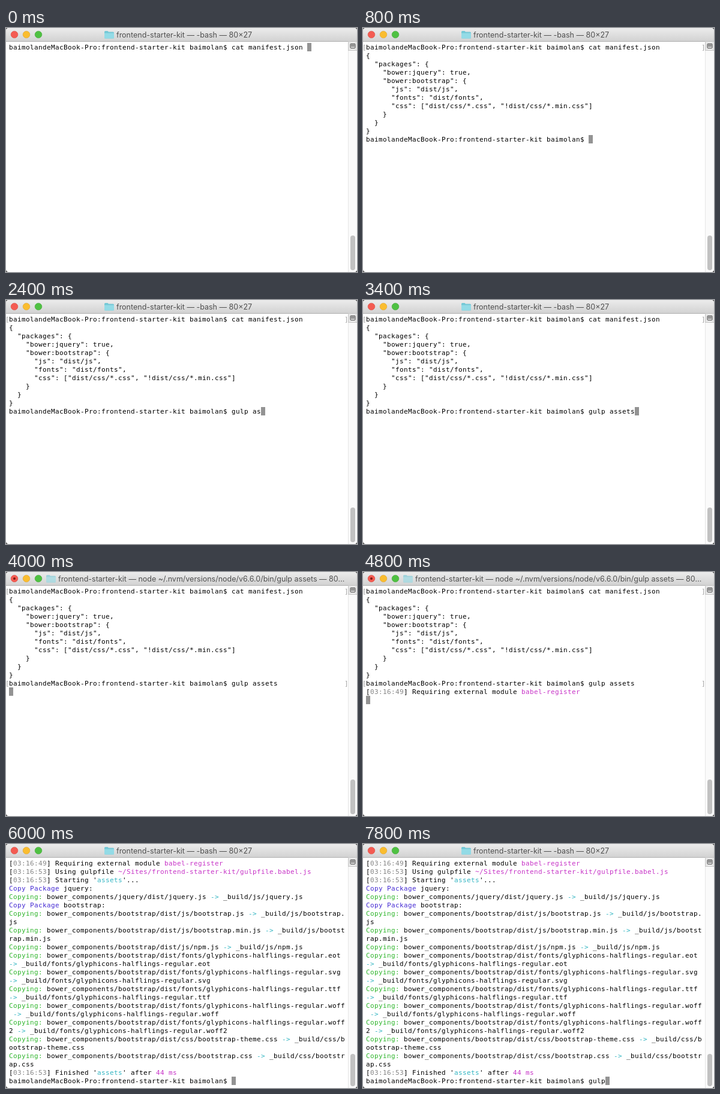
An HTML page that plays this animation: 585x408 px, repeating every 8 s.

```html
<!DOCTYPE html>
<html lang="en">
<head>
<meta charset="utf-8">
<title>Terminal</title>
<style>
  html, body { margin: 0; width: 100%; height: 100%; overflow: hidden; background: #4c4c4c; }
  svg { display: block; width: 585px; height: 408px; }
  text { white-space: pre; }
  #screen { font: 11px "DejaVu Sans Mono", monospace; font-variant-ligatures: none; }
  #title { font: 12.5px Inter, sans-serif; fill: #505050; }
</style>
</head>
<body>
<svg viewBox="0 0 585 408">
  <defs>
    <linearGradient id="bar" x2="0" y2="1">
      <stop stop-color="#ececec"/>
      <stop offset="1" stop-color="#d2d2d2"/>
    </linearGradient>
    <clipPath id="frame"><rect width="585" height="408" rx="4.5"/></clipPath>
  </defs>
  <g clip-path="url(#frame)">
    <rect width="585" height="408" fill="#fff"/>
    <rect width="585" height="22" fill="url(#bar)"/>
    <rect y="22" width="585" height="1" fill="#b1b1b1"/>
    <g stroke-width=".6">
      <circle cx="14" cy="11" r="5.8" fill="#f45b52" stroke="#d9483f"/>
      <circle cx="34" cy="11" r="5.8" fill="#fabd2f" stroke="#dda02a"/>
      <circle cx="54" cy="11" r="5.8" fill="#4fc142" stroke="#3da533"/>
    </g>
    <circle id="busy" cx="14" cy="11" r="2" fill="#7d1a14"/>
    <g id="folder">
      <path d="M0 1.5q0-1.5 1.5-1.5h4l1.5 1.5h7.500q1.500 0 1.500 1.500v8q0 1.500-1.500 1.500h-13q-1.500 0-1.500-1.500z" fill="#74c8d6"/>
      <path d="M0 3.500h16v7.500q0 1.500-1.500 1.500h-13q-1.500 0-1.500-1.500z" fill="#93dbe6"/>
    </g>
    <text id="title" y="16"></text>
    <rect x="570" y="23" width="15" height="385" fill="#fafafa"/>
    <rect x="570" y="23" width="1" height="385" fill="#e6e6e6"/>
    <rect x="570.5" y="22.500" width="15" height="15" fill="#e6e6e6" stroke="#c6c6c6"/>
    <rect x="574" y="26.500" width="8" height="7" rx="1" fill="#eee" stroke="#3c3c3c"/>
    <path d="M575 28.500h6M575 30.500h6" stroke="#3c3c3c"/>
    <rect id="thumb" x="574" width="8" rx="4" fill="#c1c1c1"/>
    <rect id="cursor" width="7" height="14" fill="#939393"/>
    <g id="screen"></g>
  </g>
</svg>
<script>
const LOOP = 8000, STEP = 200;
const COLS = 80, ROWS = 27, CW = 7, CH = 14, LEFT = 5, TOP = 25;
const COLORS = { k: '#000', e: '#858585', m: '#c733c7', c: '#33b5c2', g: '#2fb52c', b: '#452bd3', x: '#a0a0a0' };
const $ = id => document.getElementById(id);

const user = 'baimolan', dir = 'frontend-starter-kit';
const prompt = `${user}deMacBook-Pro:${dir} ${user}$ `;

// Coloured runs are written as ‹ + colour key + text + ›
const stamp = (sec, s) => `[‹e03:16:${sec}›] ${s}`;
const pack = name => `‹bCopy Package› ${name}:`;
const copy = (from, to) => `‹gCopying:› bower_components/${from}/${to} ‹c->› _build/${to.slice(5)}`;

const manifest = `{
  "packages": {
    "bower:jquery": true,
    "bower:bootstrap": {
      "js": "dist/js",
      "fonts": "dist/fonts",
      "css": ["dist/css/*.css", "!dist/css/*.min.css"]
    }
  }
}`.split('\n');

const requiring = stamp(49, 'Requiring external module ‹mbabel-register›');
const boot = file => copy('bootstrap', 'dist/' + file);
const log = [
  stamp(53, `Using gulpfile ‹m~/Sites/${dir}/gulpfile.babel.js›`),
  stamp(53, "Starting '‹cassets›'..."),
  pack('jquery'),
  '‹gCopying:› bower_components/jquery/dist/jquery.js ‹c->› _build/js/jquery.js',
  pack('bootstrap'),
  ...['bootstrap.js', 'bootstrap.min.js', 'npm.js'].map(f => boot('js/' + f)),
  ...['eot', 'svg', 'ttf', 'woff', 'woff2'].map(x => boot('fonts/glyphicons-halflings-regular.' + x)),
  ...['bootstrap-theme.css', 'bootstrap.css'].map(f => boot('css/' + f)),
  stamp(53, "Finished '‹cassets›' after ‹m44 ms›")
];

const idle = { icon: 164, text: `${dir} — -bash — 80×27` };
const starting = { icon: 67, text: `${dir} — node ~/.nvm/versions/node/v6.6.0/bin/gulp assets — 80…` };
const running = { icon: 67, text: `${dir} — gulp MANPATH=/Users/${user}/.nvm/versions/node/v6.…` };

const typed = (cmd, start, t) => cmd.slice(0, Math.max(0, Math.floor((t - start) / STEP) + 1));

// Lines on the terminal at time t; the last one holds the cursor.
function session(t) {
  const cat = prompt + 'cat manifest.json';
  if (t < 400) return { lines: [cat + ' '], entered: [], title: idle };
  const lines = [cat, ...manifest];
  if (t < 3800) {
    lines.push(prompt + typed('gulp assets', 1200, t));
    return { lines, entered: [0], title: idle };
  }
  const entered = [0, lines.length];
  lines.push(prompt + 'gulp assets');
  if (t >= 4200) lines.push(requiring);
  if (t >= 5000) lines.push(...log);
  lines.push(t < 5200 ? '' : prompt + typed('gulp', 7200, t));
  return { lines, entered, title: t < 5000 ? starting : t < 5200 ? running : idle };
}

// Splits a marked-up line into rows of [character, colour] cells.
function wrap(line) {
  const cells = [], rows = [];
  for (const [all, key, text] of line.matchAll(/‹(\w)(.*?)›|[^‹]+/g))
    for (const ch of text || all) cells.push([ch, key || 'k']);
  do rows.push(cells.splice(0, COLS)); while (cells.length);
  return rows;
}

function put(str, x, row, key) {
  const el = document.createElementNS('http://www.w3.org/2000/svg', 'text');
  el.setAttribute('x', [...str].map((_, i) => x + i * CW).join(' '));
  el.setAttribute('y', TOP + row * CH + 11);
  el.setAttribute('fill', COLORS[key]);
  el.textContent = str;
  $('screen').append(el);
}

function putRow(cells, row) {
  for (let i = 0; i < cells.length;) {
    const start = i, key = cells[i][1];
    let str = '';
    while (i < cells.length && cells[i][1] === key) str += cells[i++][0];
    put(str, LEFT + start * CW, row, key);
  }
}

function draw(t) {
  const { lines, entered, title } = session(t);
  const rows = [], marks = [];
  lines.forEach((line, i) => {
    if (entered.includes(i)) marks.push(rows.length);
    rows.push(...wrap(line));
  });
  const top = Math.max(0, rows.length - ROWS);

  $('screen').replaceChildren();
  rows.slice(top).forEach(putRow);
  for (const m of marks) if (m >= top) {
    put('[', -1, m - top, 'x');
    put(']', 564, m - top, 'x');
  }
  $('cursor').setAttribute('x', LEFT + rows.at(-1).length * CW);
  $('cursor').setAttribute('y', TOP + (rows.length - 1 - top) * CH);

  $('title').textContent = title.text;
  $('title').setAttribute('x', title.icon + 20);
  $('folder').setAttribute('transform', `translate(${title.icon} 5)`);
  $('folder').setAttribute('opacity', title === idle ? 1 : 0.6);
  $('busy').setAttribute('visibility', title === idle ? 'hidden' : 'visible');

  const thumbY = top ? 351 : 347;
  $('thumb').setAttribute('y', thumbY);
  $('thumb').setAttribute('height', 405 - thumbY);
}

let last = -1;
function tick() {
  const step = Math.floor(performance.now() % LOOP / STEP);
  if (step !== last) draw((last = step) * STEP);
  requestAnimationFrame(tick);
}
tick();
</script>
</body>
</html>
```
